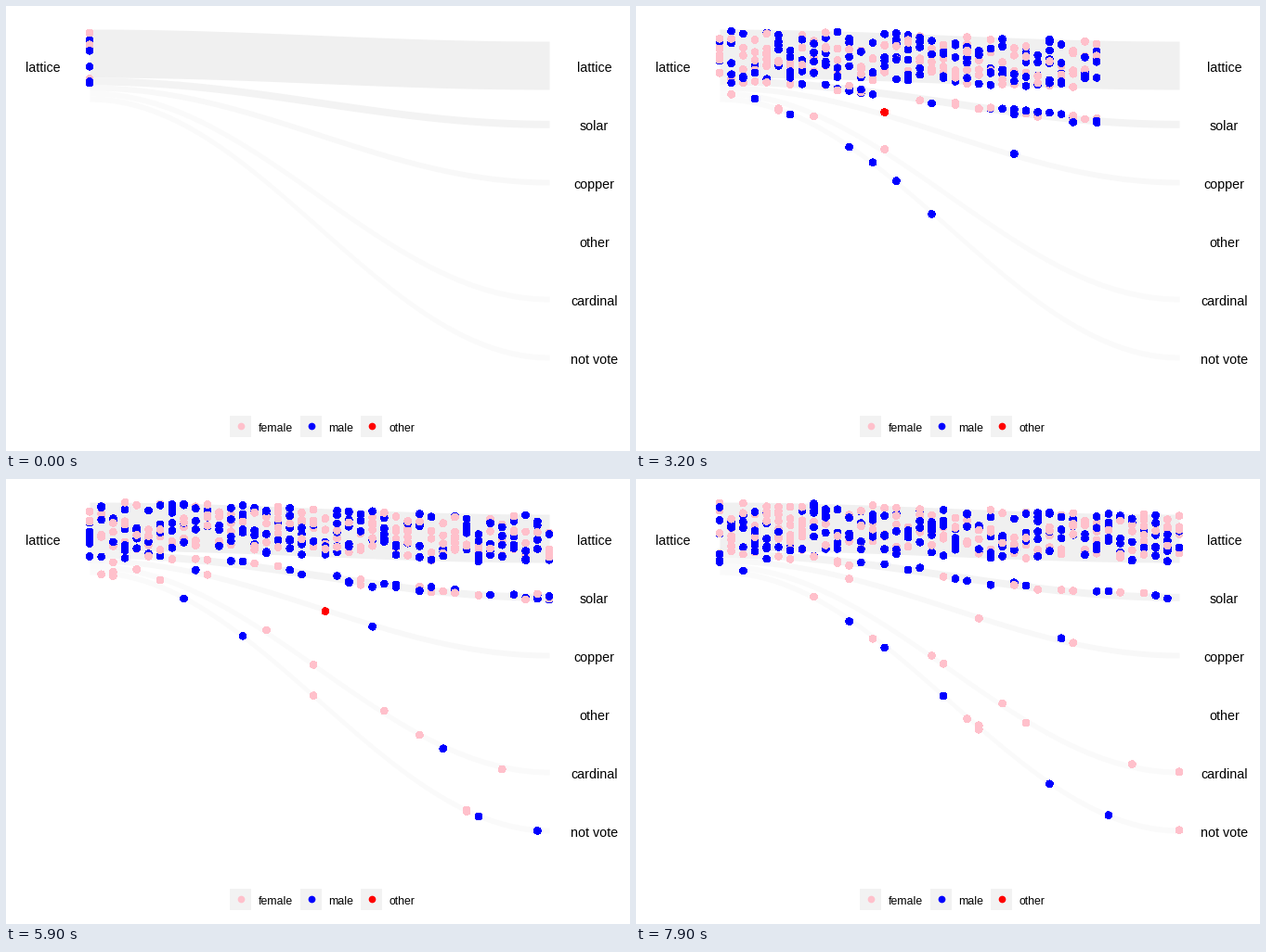
A matplotlib script that plays this animation: 672x480 px, repeating every 8 s.

```python
import numpy as np
import matplotlib.pyplot as plt
from matplotlib.animation import FuncAnimation

W, H, DPI = 672, 480, 100
FRAMES, STEPS = 80, 39   # loop length, frames a dot needs to cross
PER_STEP = 10            # dots released each frame
X0, X1 = 90, 585

PINK, BLUE, RED = "#ffc0cb", "#0000ff", "#ff0000"

# start centre, end centre, thickness, share of dots, shade
LANES = [
    (51, 64, 52, .854, "#f0f0f0"),
    (81, 127.3, 8, .10, "#f3f3f3"),
    (88, 190, 6, .01, "#f8f8f8"),
    (94, 316, 6, .018, "#fafafa"),
    (100, 379, 6, .018, "#fafafa"),
]
RED_LANE, RED_BIRTHS = 2, (18, 39)

plt.rcParams["font.family"] = ["Liberation Sans", "DejaVu Sans"]


def ease(u):
    return (1 - np.cos(np.pi * u)) / 2


# every dot keeps its lane, colour and offset from the lane centre
rng = np.random.default_rng(12)
top, bottom, thick, share = np.array([lane[:4] for lane in LANES]).T
born = np.repeat(np.arange(FRAMES), PER_STEP)
lane = rng.choice(len(LANES), born.size, p=share)
color = np.where(rng.random(born.size) < .53, BLUE, PINK)
for step in RED_BIRTHS:
    lane[step * PER_STEP], color[step * PER_STEP] = RED_LANE, RED
start, rise = top[lane], (bottom - top)[lane]
offset = rng.uniform(-.5, .5, born.size) * thick[lane]

fig = plt.figure(figsize=(W / DPI, H / DPI), dpi=DPI, facecolor="white")
ax = fig.add_axes([0, 0, 1, 1])
ax.set(xlim=(0, W), ylim=(H, 0))
ax.axis("off")


def draw_dots(x, y, c):
    return ax.scatter(x, y, s=(7.7 * 72 / DPI) ** 2, color=c, linewidths=0,
                      antialiased=False, zorder=3)


def label(x, y, text, px, ha="center"):
    ax.text(x, y, text, fontsize=px * 72 / DPI, ha=ha, va="baseline", color="black")


xs = np.linspace(X0, X1, 200)
curve = ease((xs - X0) / (X1 - X0))
for a, b, t, _, shade in LANES:
    mid = a + (b - a) * curve
    ax.fill_between(xs, mid - t / 2, mid + t / 2, color=shade,
                    linewidth=0, antialiased=False)

label(40, 71, "lattice", 14.3)
for i, name in enumerate(["lattice", "solar", "copper", "other", "cardinal", "not vote"]):
    label(633.5, 71 + 63 * i, name, 14.3)

for x, name, c in ((241, "female", PINK), (317, "male", BLUE), (382, "other", RED)):
    ax.add_patch(plt.Rectangle((x, 442), 23, 23, color="#f2f2f2", linewidth=0))
    draw_dots([x + 11.5], [453], c)
    label(x + 30.3, 459, name, 12.3, "left")

moving = draw_dots([X0], [start[0]], PINK)


def update(frame):
    age = frame - born
    live = (age >= 0) & (age <= STEPS)
    u = age[live] / STEPS
    y = start[live] + rise[live] * ease(u) + offset[live]
    moving.set_offsets(np.column_stack([X0 + (X1 - X0) * u, y]))
    moving.set_facecolor(color[live].tolist())
    return (moving,)


anim = FuncAnimation(fig, update, frames=FRAMES, interval=100,
                     repeat=True, repeat_delay=0, blit=False)
plt.show()
```
